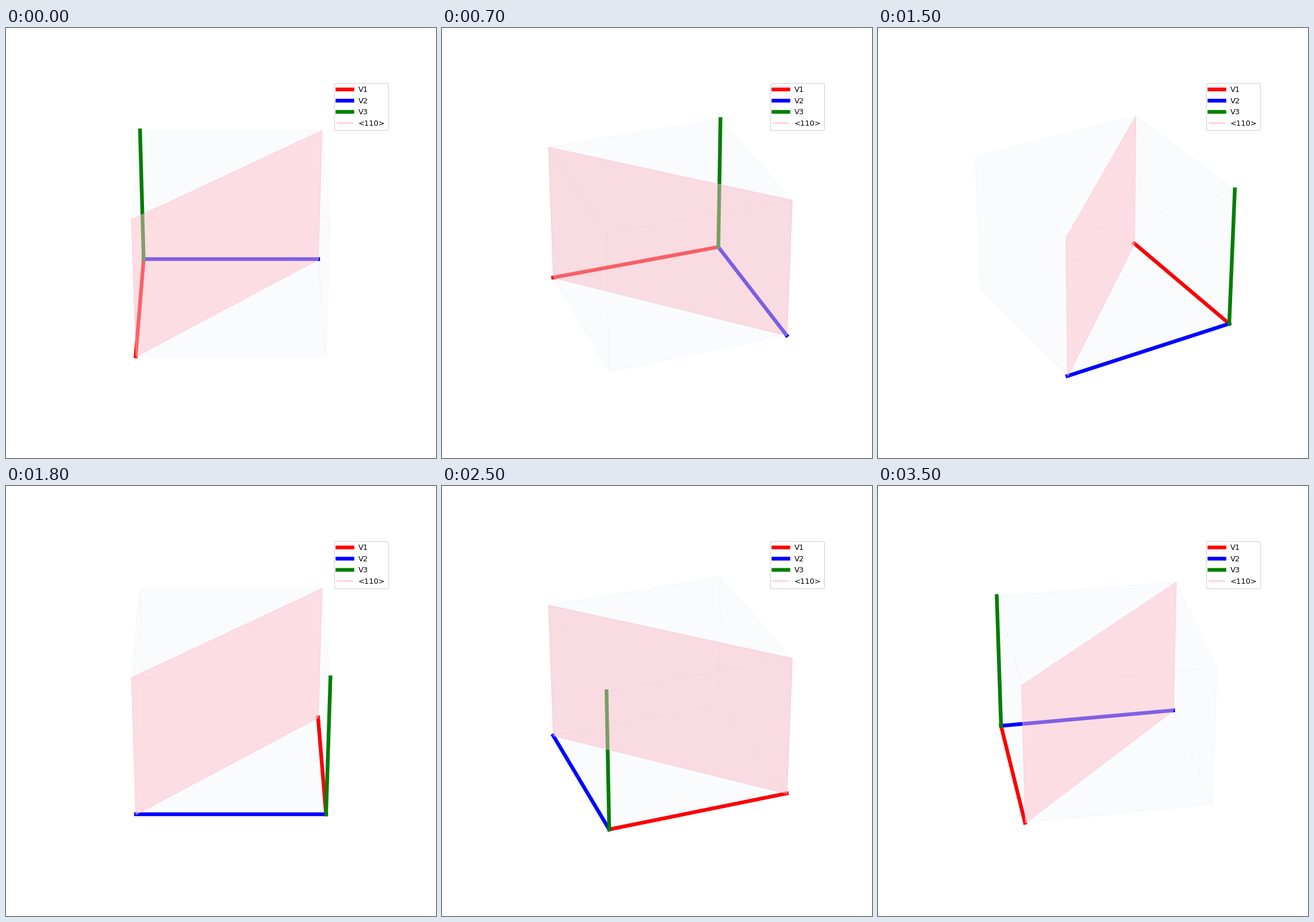
Animation, 748 px wide and 748 px high, one loop 3600 ms. Source, as a matplotlib script:

```python
import itertools

import matplotlib.pyplot as plt
import numpy as np
from matplotlib.animation import FuncAnimation
from matplotlib.colors import to_rgba
from matplotlib.lines import Line2D
from mpl_toolkits.mplot3d.art3d import Poly3DCollection

FRAMES = 36
STEP = 360 / FRAMES
AXES = [("V1", "red"), ("V2", "blue"), ("V3", "green")]

plt.rcParams["font.family"] = "DejaVu Sans"


def cube_faces():
    """Six unit squares, two per axis."""
    ring = [(0, 0), (1, 0), (1, 1), (0, 1)]
    return [[np.insert(np.array(p, float), axis, side) for p in ring]
            for axis, side in itertools.product(range(3), (0, 1))]


def centred(span):
    return 0.5 - span / 2, 0.5 + span / 2


def add_faces(faces, color, alpha):
    rgba = to_rgba(color, alpha)
    ax.add_collection3d(Poly3DCollection(
        faces, facecolors=[rgba], edgecolors=[rgba], linewidths=1))


fig = plt.figure(figsize=(8, 8), dpi=93.5, facecolor="white")
ax = fig.add_subplot(projection="3d")
ax.set_axis_off()

handles = []
for end, (name, color) in zip(np.eye(3), AXES):
    handles += ax.plot(*zip((0, 0, 0), end), color=color, lw=5, label=name)

# The plane follows the cube so that it wins depth ties.
add_faces(cube_faces(), "tab:blue", 0.01)
add_faces([[(1, 0, 0), (0, 1, 0), (0, 1, 1), (1, 0, 1)]], "pink", 0.5)

handles.append(Line2D([], [], color="pink", lw=1.5, label="<110>"))
legend = ax.legend(handles=handles, loc="upper right")
for key in legend.legend_handles:
    key.set_snap(False)

wide, tall = centred(1.1 * 25 / 24), centred(25 / 24)
ax.set_xlim(*wide, view_margin=0)
ax.set_ylim(*wide, view_margin=0)
ax.set_zlim(*tall, view_margin=0)


def update(i):
    ax.view_init(elev=30, azim=i * STEP)
    return []


anim = FuncAnimation(fig, update, frames=FRAMES, init_func=lambda: [],
                     interval=100, repeat=True, repeat_delay=0)
plt.show()
```
